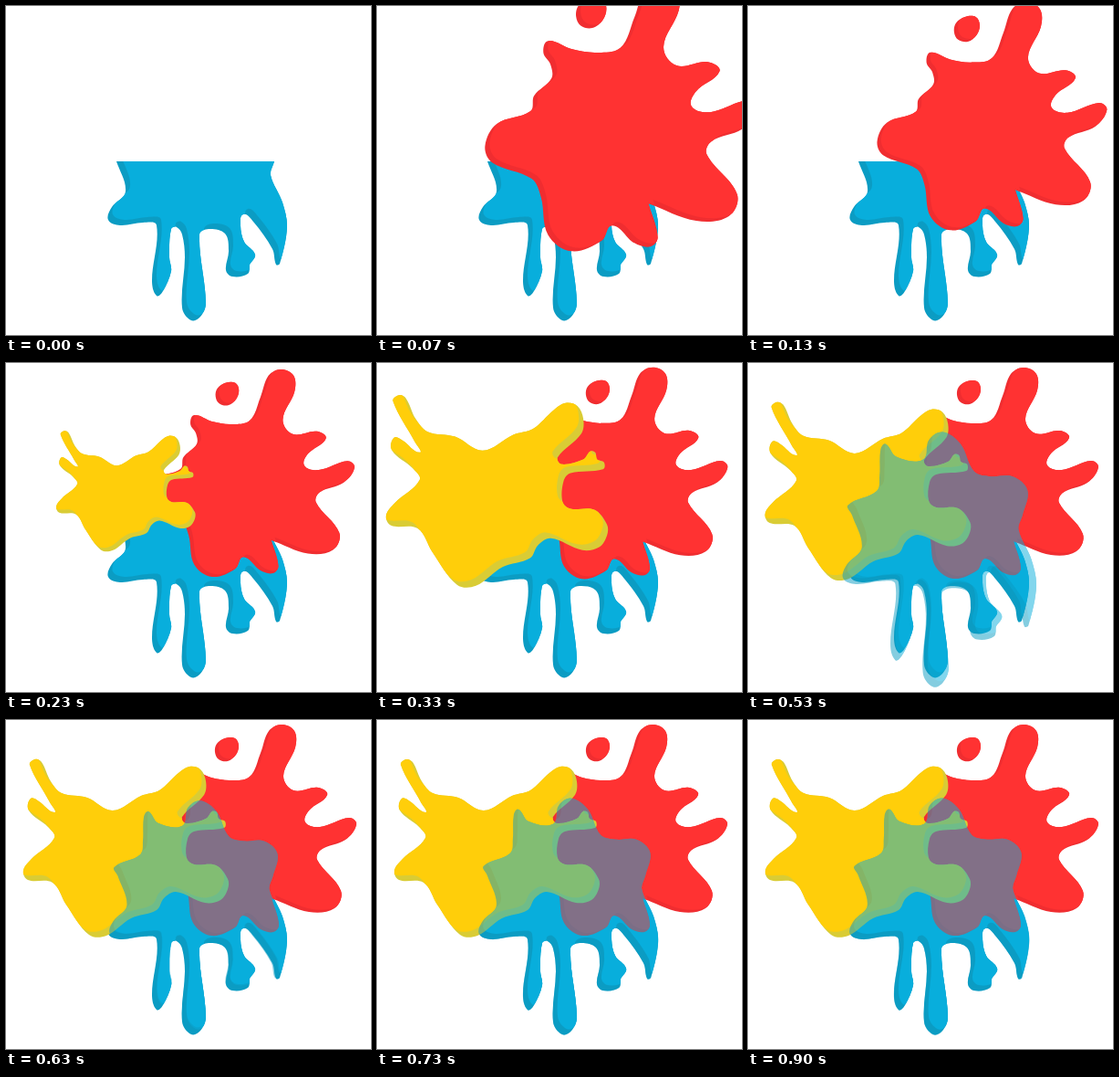
Animation, 400 px wide and 360 px high, one loop 2 s. Source, as an HTML page:

```html
<!DOCTYPE html>
<html lang="en">
<head>
<meta charset="utf-8">
<title>Paint splats</title>
<style>
  html, body { margin: 0; width: 100%; height: 100%; overflow: hidden; background: #fff; }
  svg { display: block; width: 400px; height: 360px; }
</style>
</head>
<body>
<svg id="stage" viewBox="0 0 400 360">
  <defs><clipPath id="lower"><rect y="170" width="400" height="190"/></clipPath></defs>
</svg>
<script>
const LOOP = 2000, FPS = 30, LAST_STEP = 27, POP = 640;
const stage = document.getElementById('stage');

// A repeated point makes a corner.
const blue = `155,98 166,111 193,114 199,94 213,86 231,98 245,126 262,131 284,131
  299,145 294,170 290,185 303,215 308,242 300,282 296,283 292,266 271,236 260,228
  257,240 261,258 273,272 267,283 267,283 265,293 248,296 241,289 244,268 240,249
  222,244 212,250 219,325 213,340 203,344 193,330 196,275 193,250 187,242 181,244
  179,275 181,290 172,312 165,317 160,300 165,240 150,237 125,240 112,234 116,220
  131,203 121,170 117,160 146,146 149,130 150,104`;

const red = `302,5 316,12 317,30 304,61 315,77 342,74 352,82 332,99 328,112 344,117
  376,107 384,114 372,131 345,142 341,153 367,187 360,206 332,210 291,195 291,195
  299,224 293,232 279,229 260,214 251,227 225,236 205,222 199,190 191,174 157,160
  151,146 161,127 190,116 193,103 208,88 207,76 201,66 205,56 225,63 246,66
  267,62 279,36 288,12`;

const drop = `229,35 231,26 240,20 251,20 255,28 252,38 243,45 233,43`;

const yellow = `201,51 213,54 219,67 217,82 193,106 197,113 219,108 226,100 231,101
  233,108 240,111 239,118 206,122 199,130 198,151 206,158 230,159 243,174 243,185
  235,197 218,200 186,188 173,195 165,208 137,217 110,236 91,235 66,202 51,178
  24,175 19,165 28,152 53,129 46,117 25,99 27,86 36,89 53,101 48,90 26,49
  32,43 39,46 49,67 61,80 89,85 117,99 148,83 168,77 189,58`;

// Smooth closed curve; handle length follows each segment's length.
function curve(text) {
  const pts = text.trim().split(/\s+/).map(p => p.split(',').map(Number));
  const at = i => pts[(i + pts.length) % pts.length];
  const handle = (i, length) => {
    const [a, p, b] = [at(i - 1), at(i), at(i + 1)];
    const k = length / 3 / (Math.hypot(b[0] - a[0], b[1] - a[1]) || 1);
    return [p[0] + (b[0] - a[0]) * k, p[1] + (b[1] - a[1]) * k];
  };
  return `M${pts[0]}` + pts.map((p, i) => {
    const q = at(i + 1), length = Math.hypot(q[0] - p[0], q[1] - p[1]);
    return `C${handle(i, length)} ${handle(i + 1, -length)} ${q}`;
  }).join('') + 'Z';
}

function add(parent, tag, attrs) {
  const el = document.createElementNS(stage.namespaceURI, tag);
  for (const name in attrs) el.setAttribute(name, attrs[name]);
  return parent.appendChild(el);
}

// The main colour is shifted inside the outline, leaving a shaded rim.
function splat(id, d, fill, shade, shift, attrs = {}) {
  const group = add(stage, 'g', attrs);
  add(add(group, 'clipPath', { id }), 'path', { d });
  add(group, 'path', { d, fill: shade });
  add(add(group, 'g', { 'clip-path': `url(#${id})` }), 'path',
    { d, fill, transform: `translate(${shift})` });
  return group;
}

const paint = [curve(blue), '#08aedc', '#0b9cc3', '5,-6'];
splat('base', ...paint, { 'clip-path': 'url(#lower)' });
const pops = [
  { el: splat('red', curve(red) + curve(drop), '#ff3232', '#f02d30', '4,-3'), x: 268, y: 120, delay: 0 },
  { el: splat('yellow', curve(yellow), '#ffce0a', '#d9cc35', '-5,-6'), x: 131, y: 140, delay: 200 },
  { el: splat('glaze', ...paint, { opacity: 0.5 }), x: 209, y: 216, delay: 400 }
];

function elastic(x) {
  if (x <= 0) return 0;
  if (x >= 1) return 1;
  return 1 + 2 ** (-10 * x) * Math.sin((x - 0.075) * 2 * Math.PI / 0.3);
}

function draw(now) {
  const step = Math.min(LAST_STEP, Math.floor((now % LOOP) * FPS / 1000 + 0.1));
  const time = step * 1000 / FPS;
  for (const { el, x, y, delay } of pops) {
    const s = elastic((time - delay) / POP);
    el.setAttribute('visibility', s > 0 ? 'visible' : 'hidden');
    el.setAttribute('transform', `translate(${x} ${y}) scale(${s}) translate(${-x} ${-y})`);
  }
}

const start = performance.now();
function tick() {
  draw(performance.now() - start);
  requestAnimationFrame(tick);
}
tick();
</script>
</body>
</html>
```
